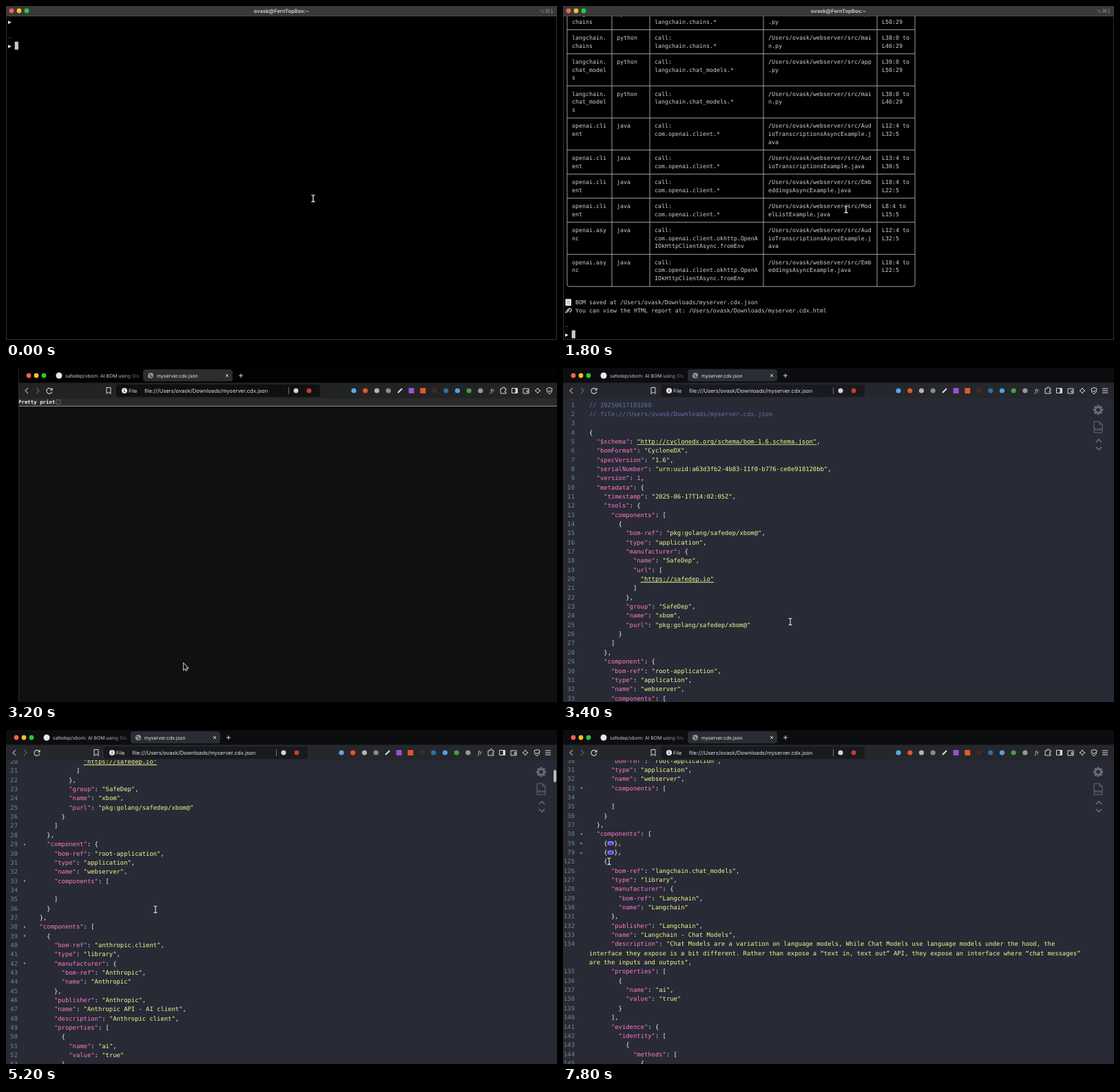
Animation, 800 px wide and 486 px high, one loop 8 s. Source, as an HTML page with a canvas:

```html
<!DOCTYPE html>
<html lang="en">
<head>
<meta charset="utf-8">
<title>BOM demo</title>
<style>
html, body { margin: 0; width: 100%; height: 100%; overflow: hidden; background: #000; }
canvas { display: block; width: 800px; height: 486px; }
</style>
</head>
<body>
<canvas id="stage"></canvas>
<script>
const W = 800, H = 486, LOOP = 8000, STEP = 200;
const canvas = document.getElementById('stage');
const dpr = window.devicePixelRatio || 1;
canvas.width = W * dpr;
canvas.height = H * dpr;
const ctx = canvas.getContext('2d');
const MONO = '"DejaVu Sans Mono", monospace', UI = 'Inter, sans-serif';
const HOME = '/Users/ovask';

// Drawing helpers
function rect(x, y, w, h, color, radius = 0) {
  ctx.fillStyle = color;
  ctx.beginPath();
  ctx.roundRect(x, y, w, h, radius);
  ctx.fill();
}
function dot(x, y, r, color) {
  ctx.fillStyle = color;
  ctx.beginPath();
  ctx.arc(x, y, r, 0, 7);
  ctx.fill();
}
function stroke(d, color, width = 1, x = 0, y = 0) {
  ctx.save();
  ctx.translate(x, y);
  ctx.strokeStyle = color;
  ctx.lineWidth = width;
  ctx.stroke(new Path2D(d));
  ctx.restore();
}
function text(s, x, y, color, font, align = 'left') {
  ctx.font = font;
  ctx.textAlign = align;
  ctx.fillStyle = color;
  ctx.fillText(s, x, y);
}
function trafficLights(x, y) {
  ['#ff5f57', '#febc2e', '#28c840'].forEach((c, i) => dot(x + i * 11, y, 3.4, c));
}
// Linear interpolation through [time, value, ...] keys
function track(keys, t) {
  const next = keys.findIndex(k => k[0] > t);
  if (next < 0) return keys.at(-1).slice(1);
  const a = keys[next - 1], b = keys[next], p = (t - a[0]) / (b[0] - a[0]);
  return a.slice(1).map((v, i) => v + (b[i + 1] - v) * p);
}

// Terminal
const CELL = 5, ROW = 11.67, TERM_FONT = '8.3px ' + MONO, TERM_INK = '#d0d0d0';
const rowY = r => 22.7 + r * ROW;
const put = (s, col, row, color = TERM_INK) => text(s, 3 + col * CELL, rowY(row) + 3, color, TERM_FONT);

const command = `xbom generate --dir ${HOME}/webserver --bom ${HOME}/Downloads/myserver.cdx.json`;
const client = ['openai.client', 'java', 'com.openai.client.*'];
const asyncClient = ['openai.async', 'java', 'com.openai.client.okhttp.OpenAIOkHttpClientAsync.fromEnv'];
const chains = ['langchain.chains', 'python', 'langchain.chains.*'];
const chat = ['langchain.chat_models', 'python', 'langchain.chat_models.*'];
const usages = [
  [...chains, 'app.py', 'L39:0', 'L50:29'],
  [...chains, 'main.py', 'L38:0', 'L46:29'],
  [...chat, 'app.py', 'L39:0', 'L50:29'],
  [...chat, 'main.py', 'L38:0', 'L46:29'],
  [...client, 'AudioTranscriptionsAsyncExample.java', 'L12:4', 'L32:5'],
  [...client, 'AudioTranscriptionsExample.java', 'L13:4', 'L30:5'],
  [...client, 'EmbeddingsAsyncExample.java', 'L10:4', 'L22:5'],
  [...client, 'ModelListExample.java', 'L8:4', 'L15:5'],
  [...asyncClient, 'AudioTranscriptionsAsyncExample.java', 'L12:4', 'L32:5'],
  [...asyncClient, 'EmbeddingsAsyncExample.java', 'L10:4', 'L22:5'],
];
const columns = [[2, 10], [15, 8], [26, 30], [59, 30], [92, 8]];

function drawTable() {
  const line = '#b0b0b0';
  let row = -1;
  usages.forEach(([module, lang, call, file, from, to], n) => {
    const cells = [module, lang, 'call:\n' + call, `${HOME}/webserver/src/${file}`, `${from} to\n${to}`]
      .map((s, i) => s.match(new RegExp(`.{1,${columns[i][1]}}`, 'g')));
    cells.forEach((parts, i) => parts.forEach((s, k) => put(s, columns[i][0], row + k)));
    row += Math.max(...cells.map(c => c.length));
    if (n < usages.length - 1) stroke(`M6 ${rowY(row) + .2}H511`, line, .9);
    row++;
  });
  const bottom = rowY(row - 1) + .3;
  for (const col of [13, 24, 57, 90]) stroke(`M${6 + col * CELL} 0V${bottom}`, line, .9);
  stroke(`M6 0V${bottom - 3}q0 3 3 3H508q3 0 3 -3V0`, line, .9);
}

function drawPrompt(row, typed, tilde) {
  put('~', 0, row - 1, tilde);
  put('▶', 0, row, '#e4e4e4');
  put(typed, 2, row);
  rect(12.7 + typed.length * CELL, rowY(row) - 5.8, 5.2, 11.6, '#c9c9c9');
}

function drawTerminal(t) {
  rect(0, 0, W, H, '#000');
  if (t < 1600) {
    put('▶', 0, 0, '#e4e4e4');
    const [count] = track([[0, 0], [200, 0], [800, command.length]], t);
    drawPrompt(3, command.slice(0, Math.floor(count)), '#5a4be0');
  } else {
    drawTable();
    rect(3.5, rowY(35) - 5, 8.5, 10, '#e8e8e8', 1);
    stroke('M2 -2H6M2 0H6M2 2H6', '#888', .6, 3.7, rowY(35));
    stroke('M1 1l3 -3q2 -2 3.5 0t0 3l-2 2M5.5 -1l-3 3q-2 2 -3.5 0', '#ccc', 1.3, 4, rowY(36));
    put(`BOM saved at ${HOME}/Downloads/myserver.cdx.json`, 3, 35);
    put(`You can view the HTML report at: ${HOME}/Downloads/myserver.cdx.html`, 3, 36);
    if (t >= 2600) stroke(`M83 ${rowY(35) + 5}H283`, TERM_INK, .8);
    drawPrompt(39, '', '#777');
  }
  rect(0, 0, W, 14.5, '#393939');
  rect(0, 14, W, 1, '#4a4a4a');
  trafficLights(8, 7);
  text('ovask@FernTopBox:~', 400, 9.6, '#c4c4c4', 'bold 7.5px ' + UI, 'center');
  text('⌥⌘1', 795, 9.6, '#8a8a8a', '7.5px "DejaVu Sans", sans-serif', 'right');
  stroke('M.5 15V485.5H799.5V15', '#333');
}

// JSON document
function component(ref, org, name, description, uses) {
  return {
    'bom-ref': ref, type: 'library',
    manufacturer: { 'bom-ref': org, name: org },
    publisher: org, name, description,
    properties: [{ name: 'ai', value: 'true' }],
    evidence: {
      identity: [{ methods: [{ technique: 'source-code-analysis', confidence: 1 }] }],
      occurrences: Array(uses).fill({ location: `${HOME}/webserver/src/app.py` }),
    },
  };
}
const bom = {
  $schema: 'http://cyclonedx.org/schema/bom-1.6.schema.json',
  bomFormat: 'CycloneDX', specVersion: '1.6',
  serialNumber: 'urn:uuid:a63d3fb2-4b83-11f0-b776-ce0e918120bb',
  version: 1,
  metadata: {
    timestamp: '2025-06-17T14:02:05Z',
    tools: {
      components: [{
        'bom-ref': 'pkg:golang/safedep/xbom@', type: 'application',
        manufacturer: { name: 'SafeDep', url: ['https://safedep.io'] },
        group: 'SafeDep', name: 'xbom', purl: 'pkg:golang/safedep/xbom@',
      }],
    },
    component: { 'bom-ref': 'root-application', type: 'application', name: 'webserver', components: [] },
  },
  components: [
    component('anthropic.client', 'Anthropic', 'Anthropic API - AI client', 'Anthropic client', 3),
    component('langchain.chains', 'Langchain', 'Langchain - Chains', 'Chains are sequences of calls to models and tools', 5),
    component('langchain.chat_models', 'Langchain', 'Langchain - Chat Models',
      'Chat Models are a variation on language models, While Chat Models use language models under the hood, ' +
      'the interface they expose is a bit different. Rather than expose a “text in, text out” API, ' +
      'they expose an interface where “chat messages” are the inputs and outputs', 2),
  ],
};
const lines = [
  '// 20250617193208', `// file://${HOME}/Downloads/myserver.cdx.json`, '',
  ...JSON.stringify(bom, null, 2).replace('[]', '[\n\n      ]').split('\n'),
];
const folds = [{ from: 39, to: 78, at: 7000 }, { from: 79, to: 124, at: 7600 }];

// Editor
const CODE_FONT = '8.85px ' + MONO, CHAR = 5.328, LINE = 13.345, LEFT = 38;
const INK = { key: '#ff79c6', string: '#f1fa8c', number: '#bd93f9', plain: '#f8f8f2', comment: '#6272a4' };

function drawCode(s, y, continued) {
  const code = (part, at, color) => text(part, LEFT + at * CHAR, y + 3, color, CODE_FONT);
  if (s.startsWith('//')) return code(s, 0, INK.comment);
  if (continued) return code(s, 0, INK.string);
  for (const m of s.matchAll(/"[^"]*"?|\d+|[^"\d\s]+/g)) {
    const part = m[0], isString = part[0] === '"';
    const isKey = isString && s[m.index + part.length] === ':';
    code(part, m.index, isKey ? INK.key : isString ? INK.string : /\d/.test(part) ? INK.number : INK.plain);
    if (part.startsWith('"http'))
      rect(LEFT + m.index * CHAR, y + 4.3, part.length * CHAR, .8, INK.string);
  }
}

function drawFolded(y) {
  text('{', LEFT + 4 * CHAR, y + 3, INK.plain, CODE_FONT);
  rect(64.5, y - 2.8, 9.5, 6, '#8a73e8', 3);
  text('↔', 69.2, y + 3, '#2a22d8', 'bold 8.85px ' + MONO, 'center');
  text('},', 74.3, y + 3, INK.plain, CODE_FONT);
}

function drawEditor(t) {
  rect(0, 44, W, H - 44, '#282a36');
  const [scroll] = track([[0, 0], [4200, 0], [4400, 18], [4600, 75], [4800, 150], [5000, 220],
    [5200, 261], [5400, 300], [5600, 345], [5800, 378], [6000, 392], [6200, 396]], t);
  const lastMarked = t < 3600 ? 0 : t < 5800 ? 48 : t < 7200 ? 78 : 110;
  let row = 0;
  lines.forEach((s, i) => {
    const number = i + 1;
    const y = 53.5 + row * LINE - scroll;
    if (y > H + 10 || folds.some(f => t >= f.at && number > f.from && number <= f.to)) return;
    const folded = folds.some(f => t >= f.at && number === f.from);
    const parts = folded ? [''] : s.match(/.{1,135}(\s|$)/g) || [''];
    row += parts.length;
    if (y < 30) return;
    text(number, 17, y + 3, '#6d8a88', CODE_FONT, 'right');
    if (folded || number <= lastMarked && number > 4 && /[[{]$/.test(s))
      text(folded ? '▸' : '▾', 27, y + 2.6, '#a3a8a8', '7.5px ' + MONO, 'center');
    if (folded) drawFolded(y);
    else parts.forEach((part, k) => drawCode(part, y + k * LINE, k > 0));
  });
  if (t >= 4400 && t < 6600) rect(795, 45 + scroll * .05, 4, 18, '#b9bac0', 2);
  drawSideTools();
}

function drawSideTools() {
  const gray = '#696c75';
  for (let i = 0; i < 8; i++) {
    const a = i * Math.PI / 4, c = Math.cos(a), s = Math.sin(a);
    stroke(`M${c * 4} ${s * 4}L${c * 7.2} ${s * 7.2}`, gray, 3, 777, 61);
  }
  ctx.strokeStyle = gray;
  ctx.lineWidth = 3;
  ctx.beginPath();
  ctx.arc(777, 61, 4.2, 0, 7);
  ctx.stroke();
  stroke('M-6 -8H2L6 -4V8H-6ZM2 -8V-4H6', gray, 1, 777, 86);
  text('RAW', 777, 91, gray, 'bold 4.5px ' + UI, 'center');
  stroke('M-4 2L0 -2L4 2M-4 9L0 13L4 9', gray, 1.6, 778, 106);
}

// Browser
const extensions = ['#5aa9e6', '#e2562b', '#b4b4b4', '#8c8c8c', null, '#9850d0', '#e2572b',
  '#3d2c25', '#2f709f', '#4aa3e8', '#4a9b45', '#999', null];
const editorChrome = { strip: '#0c0d0f', tab: '#2b2d34', bar: '#25272d', field: '#191a1f' };
const rawChrome = { strip: '#020202', tab: '#2c2e2d', bar: '#222423', field: '#0f110f' };

function drawToolbar({ strip, tab, bar, field }) {
  const ink = '#d8d9dc';
  rect(0, 0, W, 22, strip);
  rect(181, 2, 130, 17.5, tab, 4);
  trafficLights(15, 11);
  dot(59, 11, 4.5, '#e8e8e8');
  const fade = ctx.createLinearGradient(150, 0, 175, 0);
  fade.addColorStop(0, '#c6c7ca');
  fade.addColorStop(1, '#4a4b4f');
  text('safedep/xbom: AI BOM using Sta', 68, 13.6, fade, '6.9px ' + UI);
  dot(192, 11, 4, '#9a9ca1');
  stroke('M-3 -1q3 -2 3 1t3 1M-1 3l2 -3', tab, 1, 192, 11);
  text('myserver.cdx.json', 201, 13.6, '#eeeef0', '6.9px ' + UI);
  stroke('M-2 -2L2 2M2 -2L-2 2', ink, 1, 303, 11);
  stroke('M-3 0H3M0 -3V3', ink, 1, 323, 11);

  rect(0, 21.5, W, 22.5, bar);
  rect(142, 24, 296, 18, field, 4);
  stroke('M2 -4L-2 0L2 4', '#a8aab0', 1.1, 12, 33);
  stroke('M-2 -4L2 0L-2 4', '#62646a', 1.1, 28, 33);
  stroke('M3.5 -1.5A4 4 0 1 0 3.8 1.5M4 -4V-1H1', ink, 1.1, 45, 33);
  stroke('M-3 -4.5H3V4.5L0 2L-3 4.5Z', ink, 1, 131, 33);
  dot(154, 33, 4, '#e6e6e8');
  rect(153.5, 32.5, 1, 2.8, field);
  rect(153.5, 30.5, 1, 1, field);
  text('File', 160, 35.7, '#e2e2e5', '7.4px ' + UI);
  text(`file://${HOME}/Downloads/myserver.cdx.json`, 183, 35.7, '#e2e2e5', '7.7px ' + UI);
  rect(392, 28, .8, 10, '#88898e');
  dot(403, 33, 3.5, '#d5d5d8');
  dot(422, 33, 3.5, '#c93a32');
  extensions.forEach((color, i) => {
    const x = 487 + i * 16.72;
    if (color && (i === 5 || i === 6)) rect(x - 4, 29, 8, 8, color, 1);
    else if (color) dot(x, 33, 3.6, color);
  });
  stroke('M-3 3L3 -3', ink, 2.2, 554, 33);
  text('fr', 688, 35.7, ink, 'italic 8px ' + UI, 'center');
  stroke('M-4 -2H-1V-3a1.5 1.5 0 0 1 3 0V-2H4V1H3a1 1 0 0 0 0 2H4V5H-4Z', ink, 1, 704, 32);
  rect(716, 29, 9, 8, ink, 1);
  rect(717, 30, 4.5, 6, bar);
  stroke('M-4 -3H4V4H-4ZM4 0H1V2H4', ink, 1, 737, 33);
  stroke('M0 -4Q1 -1 4 0Q1 1 0 4Q-1 1 -4 0Q-1 -1 0 -4Z', ink, 1, 754, 33);
  stroke('M-4 -3L0 -4.5L4 -3Q4 3 0 5Q-4 3 -4 -3ZM-2 0L0 2L2 -1', ink, 1, 771, 33);
  stroke('M-4 -3H4M-4 0H4M-4 3H4', ink, 1.1, 787, 33);
}

function drawRawPage() {
  rect(0, 44, W, H - 44, '#0f110f');
  rect(0, 44, W, 11.5, '#2a2c2b');
  rect(0, 55, W, 1, '#8f8f8f');
  text('Pretty print', 0, 52.3, '#f0f0f0', 'bold 7.4px ' + MONO);
  stroke('M-3 -3H3V3H-3Z', '#777', .8, 58, 49.5);
}

function drawBrowser(t) {
  if (t >= 3400) {
    drawEditor(t);
    drawToolbar(editorChrome);
    return;
  }
  // Last moment of the desktop swipe, before the JSON viewer takes over
  rect(0, 0, W, H, '#000');
  ctx.save();
  ctx.translate(18, 0);
  drawRawPage();
  drawToolbar(rawChrome);
  rect(0, 0, .8, H, '#303232');
  ctx.restore();
}

// Mouse pointer
const pointerPath = [[0, 446, 280], [1600, 430, 288], [1800, 411, 296], [2200, 390, 335], [2600, 300, 410],
  [3000, 278, 417], [3200, 258, 434], [3400, 330, 369], [4000, 324, 362], [4200, 324, 362], [5200, 217, 261],
  [6200, 100, 215], [6600, 28, 180], [6800, 28, 174], [7000, 28, 168], [7400, 28, 180], [7600, 28, 182], [7800, 67, 191]];
const ARROW = 'M0 -4V5L2 3L3.5 6L5 5L3.5 2.5H6Z';
const HAND = 'M-2 -5.5Q-1 -6 -.5 -5V-1L3.5 0Q5 .5 4.5 3L3.5 5.5H-1L-4 1Q-3.5 0 -2 1Z';
const BEAM = 'M-2.5 -5Q0 -5 0 -3Q0 -5 2.5 -5M0 -3V3M-2.5 5Q0 5 0 3Q0 5 2.5 5';

function drawPointer(t) {
  if (t >= 400 && t < 1600) return;
  const [x, y] = track(pointerPath, t);
  const solid = (d, outline, fill) => {
    stroke(d, outline, 1.6, x, y);
    ctx.save();
    ctx.translate(x, y);
    ctx.fillStyle = fill;
    ctx.fill(new Path2D(d));
    ctx.restore();
  };
  if (t === 3200) solid(ARROW, '#e8e8e8', '#111');
  else if (x < 36) solid(HAND, '#111', '#fff');
  else {
    stroke(BEAM, '#222', 2.6, x, y);
    stroke(BEAM, '#eee', 1.1, x, y);
  }
}

function render(now) {
  const t = Math.floor(now % LOOP / STEP) * STEP;
  ctx.setTransform(dpr, 0, 0, dpr, 0, 0);
  ctx.textRendering = 'geometricPrecision';
  if (t < 3200) drawTerminal(t); else drawBrowser(t);
  drawPointer(t);
}

const start = performance.now();
function tick() {
  render(performance.now() - start);
  requestAnimationFrame(tick);
}
tick();
</script>
</body>
</html>
```
